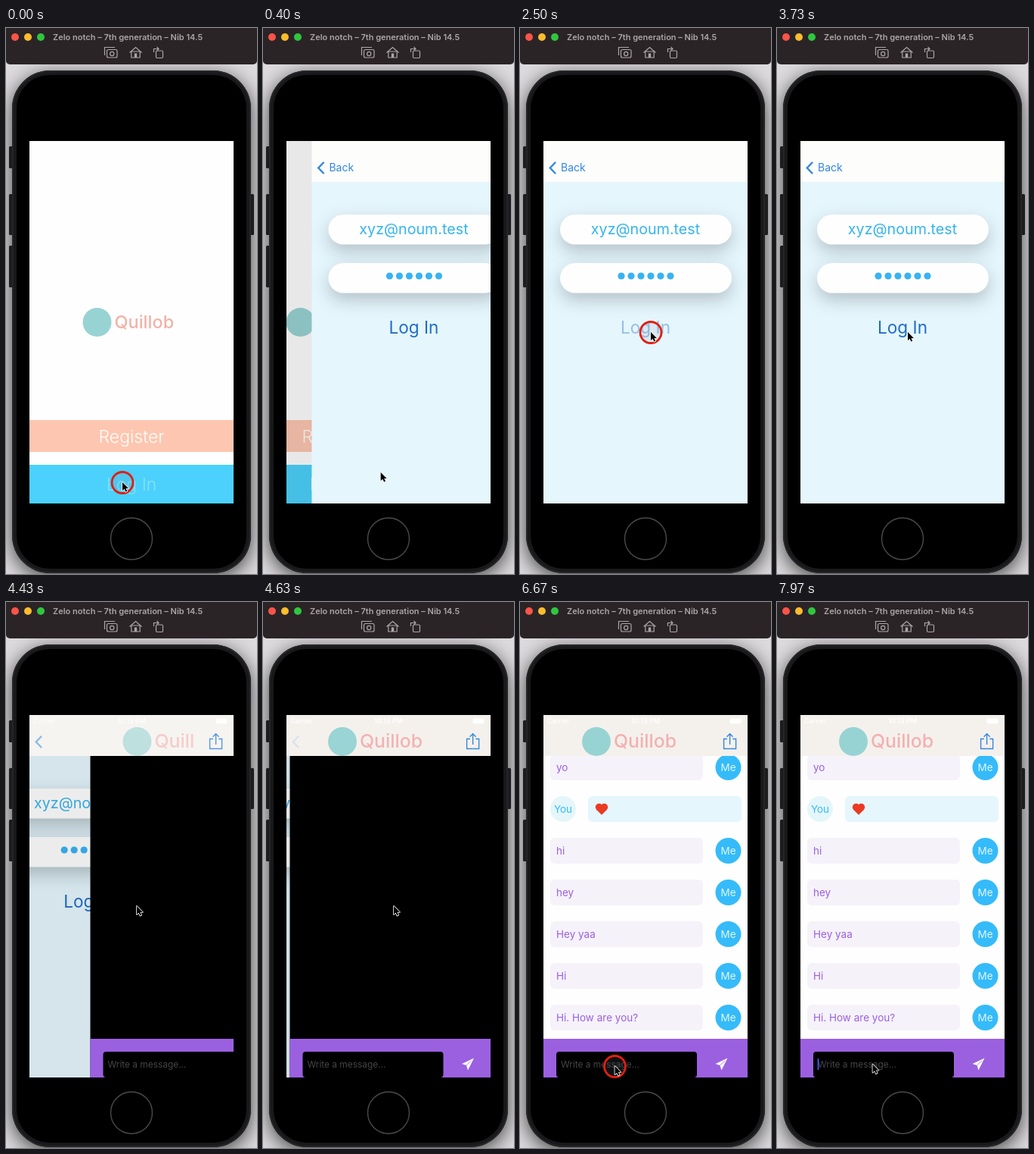
An HTML page with a canvas that plays this animation: 332 px wide and 720 px high, repeating every 8 s.

```html
<!DOCTYPE html>
<html lang="en">
<head>
<meta charset="utf-8">
<title>Chat app in a phone simulator</title>
<style>
  html, body { margin: 0; width: 100%; height: 100%; overflow: hidden; background: #dddbdd; }
  canvas { display: block; width: 332px; height: 720px; }
</style>
</head>
<body>
<canvas id="stage"></canvas>
<script>
const W = 332, H = 720, LOOP = 8000;
const LEFT = 31, TOP = 149, WIDTH = 270, HEIGHT = 478;
const NAV_H = 54, BODY_TOP = TOP + NAV_H, BODY_H = HEIGHT - NAV_H;
const BAR_H = 51, BAR_TOP = TOP + HEIGHT - BAR_H;
const MID = LEFT + WIDTH / 2;

const LOGIN_PUSH = 200, CHAT_PUSH = 4295, MESSAGES_AT = 4900, CARET_AT = 6850;
const CLICKS = [0, 2400, 6590], CLICK_MS = 160;

const BRAND = 'Quillob';
const MESSAGES = ['yo', null, 'hi', 'hey', 'Hey yaa', 'Hi', 'Hi. How are you?'];
const PURPLE = '#9b60e0', SKY = '#35bbf9', PALE = '#e5f6fd', LINK = '#3287de';
const MINT = '#98d3d3', CHROME = '#aaa5a8';

const canvas = document.getElementById('stage');
const ctx = canvas.getContext('2d');
const dpr = window.devicePixelRatio || 1;
canvas.width = W * dpr;
canvas.height = H * dpr;

const clamp01 = v => Math.max(0, Math.min(1, v));
const mix = (a, b, k) => a + (b - a) * k;
const smooth = k => k * k * (3 - 2 * k);

// Critically damped spring, as used by navigation pushes
function push(t, start) {
  const s = Math.max(0, t - start) * 0.018;
  return s > 11 ? 1 : 1 - (1 + s) * Math.exp(-s);
}

function pointerAt(t) {
  let x = 154, y = 599;
  const glide = (from, to, tx, ty) => {
    const k = smooth(clamp01((t - from) / (to - from)));
    x = mix(x, tx, k);
    y = mix(y, ty, k);
  };
  glide(250, 1150, 177, 426);
  glide(1700, 2250, 173, 401);
  glide(5600, 6450, 125.5, 612);
  glide(7000, 7300, 126.5, 609.5);
  return [x, y];
}

// Opacity of a button that dims while clicked, then recovers
function pressAlpha(t, down) {
  return t < down ? 1 : mix(0.4, 1, clamp01((t - down - CLICK_MS) / 220));
}

function rect(x, y, w, h, fill) {
  ctx.fillStyle = fill;
  ctx.fillRect(x, y, w, h);
}

function box(x, y, w, h, r, fill) {
  ctx.beginPath();
  ctx.roundRect(x, y, w, h, r);
  ctx.fillStyle = fill;
  ctx.fill();
}

function frame(x, y, w, h, r, color, width) {
  ctx.beginPath();
  ctx.roundRect(x, y, w, h, r);
  ctx.strokeStyle = color;
  ctx.lineWidth = width;
  ctx.stroke();
}

function disc(x, y, r, fill) {
  box(x - r, y - r, 2 * r, 2 * r, r, fill);
}

function ring(x, y, r, color, width) {
  frame(x - r, y - r, 2 * r, 2 * r, r, color, width);
}

function trace(points) {
  ctx.beginPath();
  for (const [x, y] of points) ctx.lineTo(x, y);
}

function line(color, width, ...points) {
  trace(points);
  ctx.strokeStyle = color;
  ctx.lineWidth = width;
  ctx.stroke();
}

// Arrow head: dx, dy reach from the tip to one arm, mirrored for the other
function chevron(x, y, dx, dy, sideways, color, width) {
  const arm = s => sideways ? [x + dx, y + s * dy] : [x + s * dx, y + dy];
  line(color, width, arm(-1), [x, y], arm(1));
}

function label(str, x, y, size, color, align = 'left', weight = 400) {
  ctx.font = `${weight} ${size}px Inter, sans-serif`;
  ctx.textAlign = align;
  ctx.fillStyle = color;
  ctx.fillText(str, x, y);
}

function fade(alpha, draw) {
  ctx.save();
  ctx.globalAlpha *= alpha;
  draw();
  ctx.restore();
}

function shadowed(color, blur, dy, draw) {
  ctx.save();
  ctx.shadowColor = color;
  ctx.shadowBlur = blur * dpr;
  ctx.shadowOffsetY = dy * dpr;
  draw();
  ctx.restore();
}

// Draw inside the screen's width, shifted sideways and faded
function layer(y, h, dx, alpha, draw, w = WIDTH) {
  ctx.save();
  ctx.beginPath();
  ctx.rect(LEFT, y, w, h);
  ctx.clip();
  ctx.translate(dx, 0);
  fade(alpha, draw);
  ctx.restore();
}

function toolbar() {
  box(0, 0, W, 48, [0, 0, 5, 5], '#2b2427');
  ['#fb5449', '#fdbc2e', '#2fc63f'].forEach((c, i) => disc(12 + 17 * i, 12, 5, c));
  label('Zelo notch – 7th generation – Nib 14.5', 62, 15.5, 11, CHROME, 'left', 600);

  frame(133.5, 28.5, 13.5, 10.5, 2, CHROME, 1.2);
  ring(140.2, 34, 2.6, CHROME, 1.2);
  line(CHROME, 1.2, [130.5, 36], [130.5, 25.5], [144, 25.5]);

  chevron(171.5, 25.5, 8, 7, false, CHROME, 1.3);
  frame(165.8, 31, 11.4, 8, 0, CHROME, 1.2);
  rect(169.8, 33.5, 3.4, 5.5, CHROME);

  frame(198.5, 30, 9, 9.5, 1.5, CHROME, 1.2);
  line(CHROME, 1.2, [195.5, 32], [195.5, 27.5], [202, 27.5]);
  chevron(202, 27.5, -2.5, 2.5, true, CHROME, 1.2);
}

function phone() {
  const shell = (inset, fill) =>
    box(8 + inset, 56 + inset, 316 - 2 * inset, 663 - 2 * inset, 50 - inset, fill);
  shadowed('rgba(0,0,0,.7)', 26, 6, () => shell(0, '#1c1b1d'));
  const button = (x, y, h) => box(x, y, 5, h, 1.5, '#1e1c1f');
  button(4, 156, 29);
  button(4, 219, 54);
  button(4, 287, 55);
  button(323, 219, 54);
  shell(0, '#252427');
  shell(2, '#19181a');
  shell(6, '#000');
  ring(166, 673.5, 27.5, '#4a494c', 1.4);
}

function welcome(t) {
  rect(LEFT, TOP, WIDTH, HEIGHT, '#fefefe');
  disc(120.5, 388, 19, MINT);
  label(BRAND, 143.5, 395.5, 23.5, '#f0b3a8', 'left', 500);
  rect(LEFT, 517, WIDTH, 42, '#fdc6b0');
  label('Register', MID, 547, 23, '#fffdfa', 'center', 300);
  rect(LEFT, BAR_TOP, WIDTH, BAR_H, '#4bd1fb');
  fade(pressAlpha(t, CLICKS[0]), () => label('Log In', MID, 610, 23, '#e4f8ff', 'center', 300));
}

function loginBody(t) {
  // Wide enough to fill the gap while the screen slides away
  rect(LEFT, BODY_TOP, WIDTH * 1.3, BODY_H, PALE);
  for (const y of [246, 310]) {
    shadowed('rgba(120,130,135,.45)', 22, 9, () => box(53, y, 227, 39.5, 20, '#fefefe'));
  }
  label('xyz@noum.test', MID, 272, 19.7, '#36b5ee', 'center');
  for (let i = 0; i < 6; i++) disc(134 + 13 * i, 327, 4.6, '#38b3f2');
  fade(pressAlpha(t, CLICKS[1]), () => label('Log In', MID, 403, 22.6, '#206cc8', 'center'));
}

function navBar(color) {
  rect(LEFT, TOP, WIDTH, NAV_H, color);
}

function backButton(textAlpha) {
  ctx.lineCap = 'round';
  chevron(39.8, 184.5, 6.7, 7, true, LINK, 2.4);
  fade(textAlpha, () => label('Back', 54, 189.3, 14, LINK));
}

// A square on its corner with a disc on each upper side
function heart(x, y, side) {
  ctx.save();
  ctx.translate(x, y);
  ctx.rotate(Math.PI / 4);
  rect(-side / 2, -side / 2, side, side, '#ea3a24');
  disc(-side / 2, 0, side / 2, '#ea3a24');
  disc(0, -side / 2, side / 2, '#ea3a24');
  ctx.restore();
}

function messageList() {
  rect(LEFT, BODY_TOP, WIDTH, BAR_TOP - BODY_TOP, '#fefefe');
  MESSAGES.forEach((text, i) => {
    const y = 218 + 55 * i;
    if (text) {
      box(40, y - 17, 202, 34, 6, '#f5f2fa');
      label(text, 48, y + 5, 13.5, PURPLE);
      disc(275.5, y, 17, SKY);
      label('Me', 275.5, y + 5, 13.5, '#e2f6ff', 'center');
    } else {
      disc(57, y, 17, '#e4f6f9');
      label('You', 57, y + 5, 13.5, SKY, 'center');
      box(90, y - 17, 203, 34, 6, PALE);
      heart(108, y + 1, 9.6);
    }
  });
}

function inputBar(t) {
  rect(LEFT, BAR_TOP, WIDTH, BAR_H, PURPLE);
  box(48, 593, 186, 34, 4, '#000');
  label('Write a message...', 54, 613.8, 11.9, '#464548');
  if (t >= CARET_AT && (t - CARET_AT) % 1000 < 500) rect(53.6, 602, 1.8, 15, '#3f5cf0');

  trace([[274.5, 601.5], [258.5, 609], [264.5, 611], [266.5, 617.5]]);
  ctx.fillStyle = '#fefefe';
  ctx.fill();
  line(PURPLE, 0.8, [264.5, 611], [271, 605]);
}

function chatBody(t) {
  rect(LEFT, BODY_TOP, WIDTH, BODY_H, '#000');
  if (t >= MESSAGES_AT) messageList();
  inputBar(t);
}

function shareIcon(x) {
  for (const s of [-1, 1]) {
    line(LINK, 1.4, [x + 3.7 * s, 180.5], [x + 8 * s, 180.5], [x + 8 * s, 193.5], [x, 193.5]);
  }
  line(LINK, 1.4, [x, 188], [x, 174]);
  chevron(x, 173.8, 4, 4, false, LINK, 1.4);
}

function statusBar() {
  label('Carrier', 36, 160, 9, '#fff');
  label('10:13 PM', MID, 160, 9, '#fff', 'center', 500);
  box(277.5, 153.5, 15, 7, 2, '#fff');
}

function chatNav(p) {
  layer(TOP, NAV_H, 0, p, () => navBar('#f4f1ed'));
  layer(TOP, NAV_H, 0.9 * WIDTH * (1 - p), Math.pow(p, 1.5), () => {
    disc(101, 184, 19, MINT);
    label(BRAND, 124, 192, 24.8, '#f2b1b0', 'left', 500);
  }, 219);
  layer(TOP, NAV_H, 0, Math.sqrt(p), () => {
    statusBar();
    shareIcon(277.6);
  });
}

function app(t) {
  const toLogin = push(t, LOGIN_PUSH);
  const toChat = push(t, CHAT_PUSH);

  if (toLogin < 1) {
    layer(TOP, HEIGHT, -0.3 * WIDTH * toLogin, 1, () => welcome(t));
    rect(LEFT, TOP, WIDTH, HEIGHT, `rgba(0,0,0,${0.1 * toLogin})`);
  }
  if (toLogin > 0 && toChat < 1) {
    const dx = WIDTH * (1 - toLogin);
    layer(BODY_TOP, BODY_H, dx - 0.3 * WIDTH * toChat, 1, () => loginBody(t));
    rect(LEFT, BODY_TOP, WIDTH, BODY_H, `rgba(0,0,0,${0.1 * toChat})`);
    layer(TOP, NAV_H, dx, 1, () => navBar('#fdfdfc'));
  }
  if (toChat > 0) {
    layer(BODY_TOP, BODY_H, WIDTH * (1 - toChat), 1, () => chatBody(t));
    chatNav(toChat);
  }
  if (toLogin > 0 && toChat < 1) {
    layer(TOP, NAV_H, WIDTH * (1 - toLogin), Math.sqrt(1 - toChat),
      () => backButton(clamp01(1 - 1.5 * toChat)));
  }
}

function pointer(t) {
  const [x, y] = pointerAt(t);
  if (CLICKS.some(c => t >= c && t < c + CLICK_MS)) {
    disc(x, y + 0.5, 14, 'rgba(120,130,140,.12)');
    ring(x, y + 0.5, 14, '#e01f12', 2.8);
  }
  ctx.save();
  ctx.translate(x, y);
  trace([[0, 0], [0, 11], [2.6, 8.7], [4.4, 12.6], [6.2, 11.8], [4.5, 8], [7.9, 8]]);
  ctx.closePath();
  ctx.lineJoin = 'round';
  ctx.strokeStyle = '#f4f3f4';
  ctx.lineWidth = 1.7;
  ctx.stroke();
  ctx.fillStyle = '#000';
  ctx.fill();
  ctx.restore();
}

function render(t) {
  ctx.setTransform(dpr, 0, 0, dpr, 0, 0);
  rect(0, 0, W, H, '#dddbdd');
  phone();
  toolbar();
  app(t);
  pointer(t);
}

const start = performance.now();
function tick() {
  render((performance.now() - start) % LOOP);
  requestAnimationFrame(tick);
}
tick();
</script>
</body>
</html>
```
